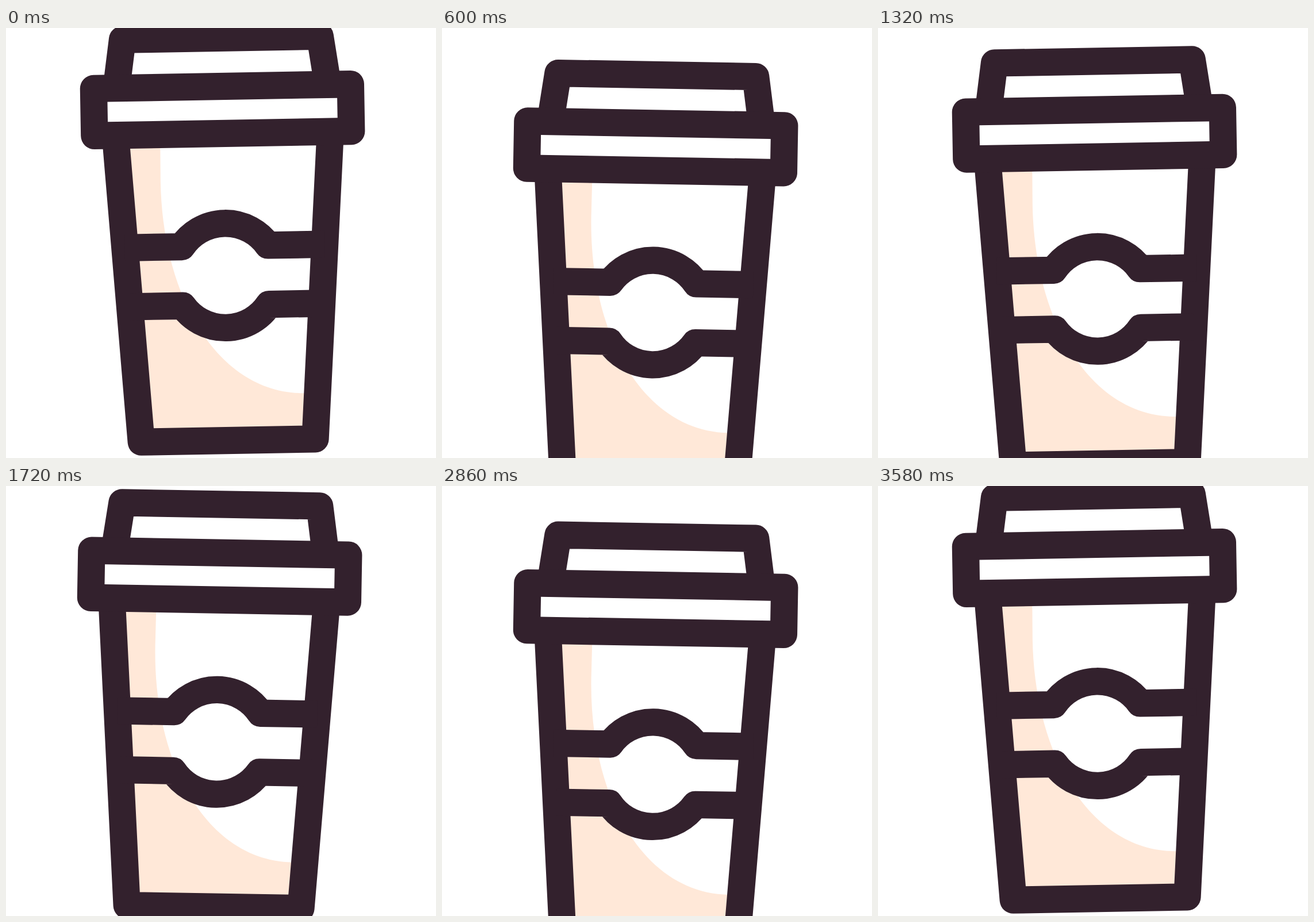
An HTML page that plays this animation: 748 by 748 pixels, repeating every 3.6 s.

```html
<!DOCTYPE html>
<html lang="en">
<head>
<meta charset="utf-8">
<title>Coffee cup</title>
<style>
  html, body { margin: 0; width: 100%; height: 100%; overflow: hidden; background: #fff; }
  svg { display: block; width: 100vw; height: 100vh; }
</style>
</head>
<body>
<svg viewBox="0 0 748 748">
  <g id="cup" fill="none" stroke="#33212d" stroke-width="47.3" stroke-linejoin="round">
    <path fill="#ffe8d8" stroke="none"
      d="M190 190H264.9L264.2 265C264.2 470 360 637.7 510 637.7H528L522 717H223Z"/>
    <path d="M187.1 183.5L222.7 717.6H525.5L561.1 183.5"/>
    <path d="M200 379.3H299.2A90.8 90.8 0 0 1 449 379.3H548"/>
    <path d="M207 482H299.2A90.8 90.8 0 0 0 449 482H541"/>
    <path d="M190.2 101.5L202.2 17.2H546L558 101.5"/>
    <path d="M150.6 101.5H597.6V183.5H150.6Z"/>
  </g>
</svg>
<script>
const LOOP = 3600, STEP = 20;
const cup = document.getElementById('cup');

// [time, value] keys
const bob = [[0, 0], [755, 72.3], [1845, 12.5], [2800, 72.3], [3570, 0], [LOOP, 0]];
const tilt = [[0, -1], [600, 1], [1200, -1], [1800, 1], [2400, -1], [2970, 1], [3510, -1], [LOOP, -1]];

const smooth = p => p * p * (3 - 2 * p);
const sharp = p => p < 0.5 ? 0.5 * (2 * p) ** 5.5 : 1 - 0.5 * (2 - 2 * p) ** 5.5;

function sample(keys, t, ease) {
  let i = 1;
  while (i < keys.length - 1 && t >= keys[i][0]) i++;
  const [t0, a] = keys[i - 1], [t1, b] = keys[i];
  return a + (b - a) * ease((t - t0) / (t1 - t0));
}

function draw(ms) {
  const t = Math.floor((ms % LOOP) / STEP) * STEP;
  const y = sample(bob, t, smooth), angle = sample(tilt, t, sharp);
  cup.setAttribute('transform', `translate(0 ${y.toFixed(3)}) rotate(${angle.toFixed(4)} 374 0)`);
}

let start = null;
function tick(now) {
  if (start === null) start = now;
  draw(Math.max(0, now - start));
  requestAnimationFrame(tick);
}
draw(0);
requestAnimationFrame(tick);
</script>
</body>
</html>
```
